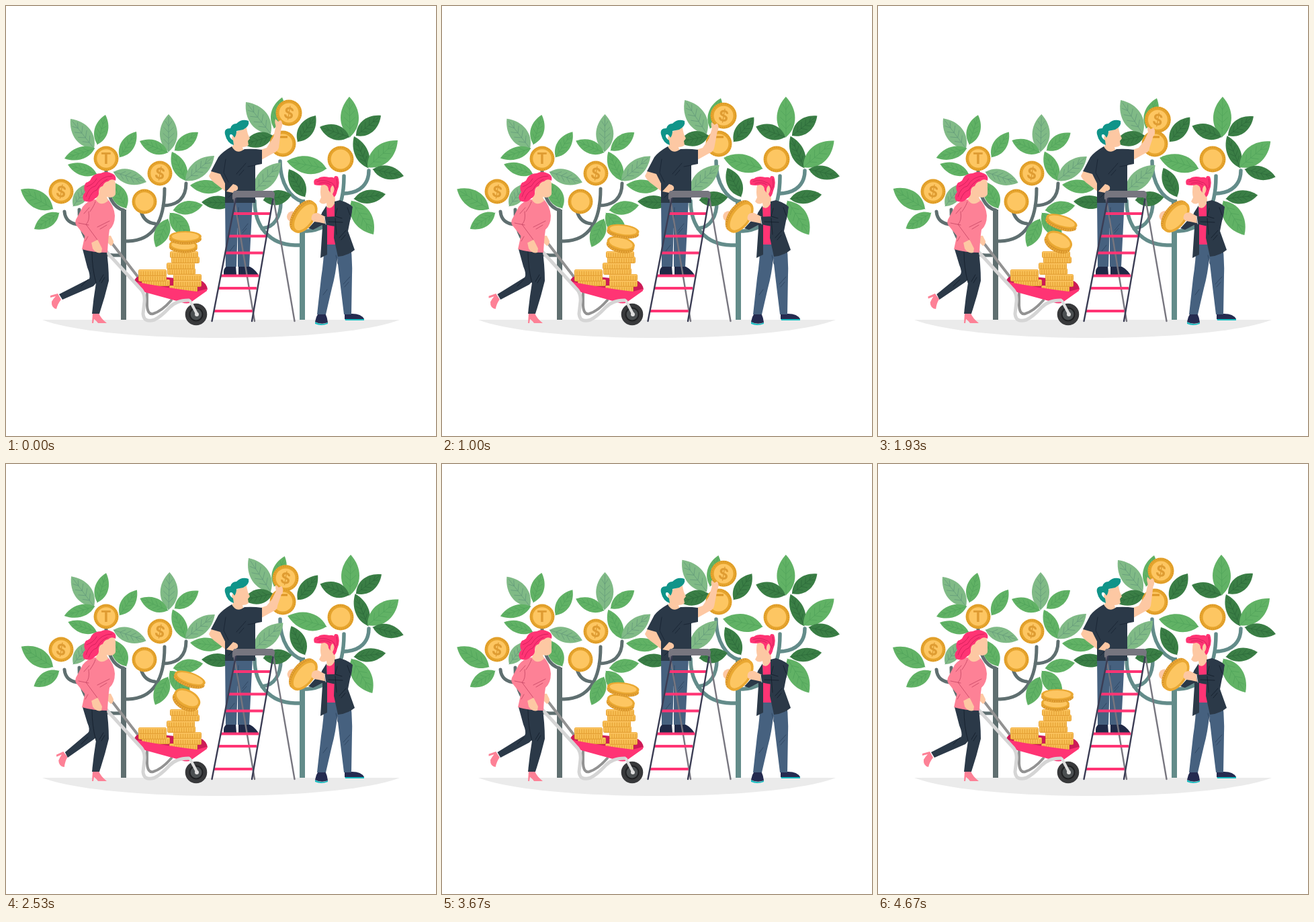
These frames come from a looping animation (640x640 px, 4.81 s). An HTML page:

```html
<!DOCTYPE html>
<html lang="en">
<head>
<meta charset="utf-8">
<title>Money trees</title>
<style>
  html, body { margin: 0; width: 100%; height: 100%; overflow: hidden; background: #fff; }
  svg { display: block; width: 100vw; height: 100vh; }
  .line { fill: none; stroke-linecap: round; stroke-linejoin: round; }
  .fold { fill: none; stroke-width: .8; stroke-linecap: round; }
  text { font: bold 23px Inter, Arial, sans-serif; text-anchor: middle; fill: #df9c32; }
  .skin { fill: #fdc8a3; }
  .navy { fill: #2b3948; }
  .denim { fill: #46617f; }
  .rose { fill: #fd8196; }
  .pink { fill: #ff3474; }
</style>
</head>
<body>
<svg viewBox="0 0 640 640">
  <path fill="#ebebeb" d="M54 467H586C540 485 430 494 320 494S100 485 54 467Z"/>

  <g class="line" stroke="#5f6f70" stroke-width="5">
    <path stroke-width="8" stroke-linecap="butt" d="M175 467V303"/>
    <path d="M175 304C160 300 149 285 149 245M175 350H182C218 349 236 322 236 272M234 297C257 297 268 284 268 264M201 306C204 316 211 323 222 324"/>
    <path d="M175 371H160C130 370 109 345 109 303M87 306C88 318 96 325 110 325"/>
  </g>
  <g class="line" stroke="#638c8a" stroke-width="5.5">
    <path stroke-width="8" stroke-linecap="butt" d="M441 467V288"/>
    <path d="M441 291C424 286 408 265 408 231M441 335H448C487 333 503 300 503 253M504 279C528 278 540 264 540 245"/>
    <path d="M441 356H430C392 355 370 328 370 290M381 331C400 330 409 312 409 292"/>
  </g>

  <g id="leaves"></g>
  <g id="treeCoins"></g>

  <!-- man on the ladder -->
  <g>
    <path fill="#1f2946" d="M324 400Q323 390 329 387H342L343 400ZM346 400V387H360Q368 389 375 399V400Z"/>
    <path class="denim" d="M326 288H367L362 388H345L345 326L343 388H327Z"/>
    <path class="fold" stroke="#2c425c" d="M346 300L345 330M352 334L360 324M333 365L340 356M352 338L358 331"/>
    <path class="skin" d="M306 245L302 253Q305 260 314 266L328 277Q337 281 345 274Q348 268 340 265L329 264L319 249Z"/>
    <path class="skin" d="M340 188L336 196L338 207L334 214Q343 224 354 217L352 210Q358 210 361 207L360 201L363 197Q359 190 358 181Z"/>
    <path id="arm" class="skin"/>
    <path class="navy" d="M336 209Q343 222 355 213Q368 212 381 214V235L371 237L371 293H326V264L319 250L305 246L316 225Q322 217 336 209Z"/>
    <path class="fold" stroke="#172331" d="M327 228L324 248L331 262M371 237L360 239M343 250L357 234M347 252L354 244M331 285L344 272"/>
    <path fill="#109489" d="M326 191Q324 182 334 182Q336 175 343 175Q351 167 361 171Q363 179 353 184L343 186Q343 192 340 196Q336 189 333 192Q332 196 338 200L339 207Q329 204 326 191Z"/>
    <path class="skin" d="M338 265Q347 267 345 273L338 278L328 276Z"/>
  </g>
  <g id="heldHigh"></g>
  <path id="fingers" class="skin"/>

  <!-- ladder -->
  <g class="line">
    <path stroke="#77767f" stroke-width="2.4" d="M339 283L370 469M397 280L429.5 469"/>
    <path id="rungs" stroke="#ff3474" stroke-width="4" stroke-linecap="butt"/>
    <path stroke="#3b3d54" stroke-width="2.4" d="M342.5 284L306.5 469M398 284L366 469"/>
  </g>
  <path fill="#77767f" d="M340 275H396Q400 276 400 281L399 287L394 285H343L337 288Q336 277 340 275Z"/>

  <!-- man with the coin -->
  <g>
    <path id="farHand" class="skin" d="M427 305Q419 306 418 313Q418 319 424 321L432 320Z"/>
    <path fill="#18bcc0" d="M460 470Q469 476 479 471V473Q469 477 460 473ZM504 465H533V468H505Z"/>
    <path fill="#252b50" d="M460 470Q461 463 465 457H475Q478 463 479 471Q469 475 460 470ZM504 458H515Q529 458 533 466H504Z"/>
    <path class="denim" d="M474 350H512Q516 375 515 400L514 459H503L497 410L493 375Q491 398 485 420L476 459H463L469 405Q473 380 474 350Z"/>
    <path class="fold" stroke="#2c425c" d="M491 371L494 384M502 414L512 403M504 418L510 411M472 430L478 422"/>
    <path class="skin" d="M469 266Q467 278 469 285L466 291Q471 297 477 293L478 301L486 304L490 292L489 265Z"/>
    <path class="pink" d="M477 299Q484 304 489 294L493 355H478Z"/>
    <path class="navy" d="M489 291L497 289Q510 293 516 299L509 335L519 363Q508 372 494 373L488 345L489 318ZM477 297L470 308L471 330L468 375L478 370L478 320Z"/>
    <path id="farArm" class="navy" d="M470 309L450 331L457 333L473 325Z"/>
    <path class="pink" d="M459 266Q456 257 464 257Q470 252 481 255Q486 254 488 256Q489 251 494 254Q498 264 493 275Q491 284 488 284L486 280Q491 271 486 267Q482 270 483 278L480 274Q480 267 474 266Q466 268 459 266Z"/>
    <path class="fold" stroke="#cc1c57" d="M463 261Q474 258 481 262Q489 263 491 274M466 264Q477 261 483 266M492 257Q494 266 492 271"/>
    <g id="heldLow"></g>
    <g id="nearHand">
      <path class="skin" d="M476 314L464 308Q456 308 455 313Q453 319 459 321L466 322L475 324Z"/>
      <path class="navy" d="M515 299Q515 320 507 326Q497 331 475 325L474 314L494 313L497 300Z"/>
      <path class="fold" stroke="#fff" d="M474 314L476 325"/>
    </g>
    <path class="fold" stroke="#121c29" d="M493 301L490 313L500 316M508 300L512 311M480 321L501 322M496 345L506 334M499 348L505 341M490 316L492 340"/>
  </g>

  <!-- wheelbarrow -->
  <g class="line" stroke="#929292" stroke-width="4">
    <path d="M156 351L197 404M210 427V446Q211 460 219 458Q232 454 246 438"/>
  </g>
  <path fill="#cd1b57" d="M194 404L203 400L291 409Q299 413 300 422L282 428L189 411Z"/>
  <g id="piles"></g>
  <g id="loose"></g>
  <path class="pink" d="M189 411L196 411Q236 419 284 425L299 421V424L275 441Q270 444 261 441L207 426Q195 419 189 411Z"/>
  <path class="line" stroke="#d5d5d5" stroke-width="5" d="M140 363H147L202 423Q207 430 206 440L204 458Q205 472 221 467Q231 462 243 449Q253 438 272 438"/>
  <circle cx="283" cy="459" r="16.3" fill="#38393b"/>
  <circle cx="283" cy="459" r="9.5" fill="#4b4f51" stroke="#1f2022" stroke-width="2"/>
  <path class="line" stroke="#dedede" stroke-width="4" d="M274 439L284 458"/>
  <circle cx="284" cy="459" r="3" fill="#dedede"/>

  <!-- woman -->
  <g>
    <path id="backShoe" class="rose" d="M77 428L82 437Q77 443 75 451Q67 449 68 440Q71 435 74 432L66 434L66 431Z"/>
    <path id="backLeg" class="navy"/>
    <path class="rose" d="M129 457H138Q141 465 150 472H137Q134 468 131 466L130 472H128Z"/>
    <path class="navy" d="M120 360L149 359Q153 385 153 409Q147 434 139 458H128Q130 436 134 412L126 385Z"/>
    <path class="fold" stroke="#121c29" d="M128 366Q128 390 134 412M112 417L122 407M139 410L145 400M142 412L147 404"/>
    <path class="skin" d="M152 346Q151 341 156 342L160 350Q160 356 156 357L150 351Z"/>
    <path class="rose" d="M132 288L150 286Q161 297 162 312Q162 326 154 333Q152 346 151 367Q130 367 113 362L120 330L107 328Q103 324 105 318L114 299Q121 290 132 288Z"/>
    <path class="skin" d="M139 268L138 280Q134 285 134 289Q141 299 152 290L150 284Q160 287 163 280V264Q161 254 148 251Z"/>
    <path class="skin" d="M126 347L129 361Q134 369 142 367L143 361L136 347Z"/>
    <path class="rose" d="M112 303Q122 302 122 314L121 325L136 348L126 353L106 328Q102 324 104 318Z"/>
    <path class="fold" stroke="#c54563" d="M123 306Q125 320 119 325L136 348M108 323L123 326M136 329L154 320M140 332L150 326M125 306Q132 296 133 291M116 309L124 300M118 350L122 343"/>
    <path class="pink" d="M116 290Q112 283 118 277Q114 269 119 263Q125 261 126 258Q130 249 141 249Q149 245 157 249Q165 252 163 260Q157 256 152 261Q146 262 144 268Q138 269 138 277Q139 283 132 287Q126 294 116 290Z"/>
    <path class="fold" stroke="#cc1c57" d="M119 284Q123 270 133 268Q141 253 158 253M123 288Q127 276 135 274Q141 262 151 258M120 269Q130 266 135 257"/>
  </g>
</svg>
<script>
const LOOP = 4810, SWING = 4670;
const $ = id => document.getElementById(id);
const set = (el, attrs) => { for (const k in attrs) el.setAttribute(k, attrs[k]); return el; };
const add = (parent, tag, attrs) =>
  parent.appendChild(set(document.createElementNS('http://www.w3.org/2000/svg', tag), attrs));

const TONES = {
  g: ['#61b265', '#51a35b'],
  p: ['#80ba86', '#63997a'],
  d: ['#3a7e45', '#2c6a3a']
};
// base x, base y, tip x, tip y, half width, tone
const TREES = {
  left: [
    [131,212, 96,168, 13,'p'], [136,206, 148,162, 10,'g'], [169,225, 194,187, 10,'g'],
    [132,212, 87,227, 9,'g'], [135,250, 92,236, 9,'g'], [160,247, 209,262, 11,'p'],
    [179,301, 158,262, 11,'g'], [100,298, 125,264, 10,'p'], [70,302, 22,273, 13,'g'],
    [79,308, 42,332, 10,'g'], [242,217, 242,161, 13,'p'], [241,218, 199,201, 10,'g'],
    [251,215, 286,188, 10,'g'], [268,260, 247,217, 10,'g'], [267,260, 310,223, 12,'p'],
    [249,304, 293,296, 10,'g'], [241,317, 223,359, 11,'g'], [244,308, 274,344, 12,'g']
  ],
  middle: [
    [323,271, 274,267, 10,'g'], [338,293, 291,292, 10,'d'], [394,190, 357,143, 14,'p'],
    [399,182, 411,136, 10,'g'], [397,193, 354,206, 11,'d'], [434,202, 461,163, 11,'d'],
    [477,242, 418,231, 13,'g'], [368,277, 409,233, 13,'p'], [445,284, 421,243, 11,'d'],
    [383,289, 425,281, 11,'d']
  ],
  right: [
    [512,195, 511,135, 13.5,'g'], [511,195, 467,180, 11,'d'], [521,193, 558,163, 11,'d'],
    [539,241, 518,194, 10,'d'], [538,240, 583,200, 14,'g'], [546,243, 592,253, 10,'d'],
    [518,287, 565,280, 10,'d'], [514,290, 547,340, 14,'g']
  ]
};

function makeLeaf([bx, by, tx, ty, half, tone]) {
  const len = Math.hypot(tx - bx, ty - by);
  const angle = Math.atan2(ty - by, tx - bx) * 180 / Math.PI;
  const [fill, stroke] = TONES[tone];
  const el = add($('leaves'), 'g', {});
  const w = half * 4 / 3, a = len * .25, b = len * .68;
  add(el, 'path', { fill, d: `M0 0C${a} ${-w} ${b} ${-w} ${len} 0C${b} ${w} ${a} ${w} 0 0Z` });
  let d = `M0 0H${len * .92}`;
  for (let u = .2; u < .8; u += .16) {
    const x = u * len, y = half * .62 * Math.sin(Math.PI * (u + .12));
    d += `M${x + len * .13} ${-y}L${x} 0L${x + len * .13} ${y}`;
  }
  add(el, 'path', { d, class: 'line', stroke, 'stroke-width': .7 });
  return turn => set(el, { transform: `translate(${bx} ${by}) rotate(${angle + turn})` });
}
const leaves = Object.fromEntries(
  Object.entries(TREES).map(([name, list]) => [name, list.map(makeLeaf)]));

function faceCoin(parent, x, y, r, mark = '', tilt = 10) {
  const el = add(parent, 'g', { transform: `translate(${x} ${y})` });
  add(el, 'circle', { r, fill: '#e6a42d' });
  add(el, 'circle', { r: r - 1.6, fill: 'none', stroke: '#d39224', 'stroke-width': 1.6, 'stroke-dasharray': '1.2 2' });
  add(el, 'circle', { r: r * .74, fill: '#fdc662' });
  if (mark) add(el, 'text', { y: 8.3, transform: `rotate(${tilt})` }).textContent = mark;
  return el;
}

// coin seen at an angle; depth shifts the rim
function tiltedCoin(parent, rx, ry, depth) {
  const el = add(parent, 'g', {});
  add(el, 'ellipse', { cy: depth, rx, ry, fill: '#d9952a' });
  add(el, 'ellipse', { cy: depth * .7, rx: rx - .8, ry: ry - .5, fill: 'none', stroke: '#f0b244', 'stroke-width': 2, 'stroke-dasharray': '1.4 2' });
  add(el, 'ellipse', { rx, ry, fill: '#eaa832' });
  add(el, 'ellipse', { rx: rx * .84, ry: ry * .76, fill: '#fdc662' });
  return el;
}

function flatCoin(x, y) {
  const el = add($('piles'), 'g', { transform: `translate(${x} ${y})` });
  add(el, 'rect', { x: -21, y: -5, width: 42, height: 10, rx: 2.5, fill: '#e5a135' });
  add(el, 'path', { d: 'M-20 .5H20', stroke: '#f8bf55', 'stroke-width': 6.5, 'stroke-dasharray': '2.4 1.1' });
  add(el, 'path', { d: 'M-19.5 -3.6H19.5', stroke: '#fdc662', 'stroke-width': 2, 'stroke-linecap': 'round' });
}

const tree = $('treeCoins');
faceCoin(tree, 149, 227, 18.5, 'T', 0);
faceCoin(tree, 82, 276, 18.5, '$');
faceCoin(tree, 229, 249, 18.5, '$');
faceCoin(tree, 206, 291, 18.5);
faceCoin(tree, 498, 228, 19.5);
const barred = faceCoin(tree, 412, 205, 19.5);
add(barred, 'path', { d: 'M-7 -10H7', stroke: '#dc9526', 'stroke-width': 3 });

for (const [x, y] of [
  [264, 421], [270, 413], [270, 404], [261, 395], [260, 387], [267, 378], [265, 370],
  [223, 412], [218, 405], [218, 397]
]) flatCoin(x, y);

set($('rungs'), {
  d: [309, 342.5, 367.5, 401.5, 420, 454].map(y => {
    const x = 337.5 - (y - 309) * .195;
    return `M${x} ${y}h${56 + (y - 309) * .01}`;
  }).join('')
});

const high = faceCoin($('heldHigh'), 0, 0, 19.5, '$');
const low = tiltedCoin($('heldLow'), 26.5, 14.5, -4);
const lower = tiltedCoin($('loose'), 21, 9, 4);
const upper = tiltedCoin($('loose'), 24, 8, 4);

const place = (el, x, y, turn = 0, sy = 1) =>
  set(el, { transform: `translate(${x} ${y}) rotate(${turn}) scale(1 ${sy})` });

// quick rise, hold, soft fall
function gust(t) {
  if (t < 800) { const u = t / 800; return u * u * (3 - 2 * u); }
  if (t < 2500) return 1;
  return t < SWING ? (1 - (t - 2500) / (SWING - 2500)) ** 3 : 0;
}

function draw(t) {
  const p = t < SWING ? (1 - Math.cos(2 * Math.PI * t / SWING)) / 2 : 0;
  const mix = (a, b) => a + (b - a) * p;

  leaves.left.forEach(turn => turn(1.4 * p));
  leaves.right.forEach(turn => turn(2 * p));
  leaves.middle.forEach((turn, i) => turn((i < 2 ? 1.2 : 5) * gust(t)));

  place(high, mix(421, 416), mix(159, 170));
  set($('arm'), {
    d: `M379 214L388 211L${mix(398, 396)} ${mix(195, 201)}L402 ${mix(177, 189)}` +
       `L${mix(410, 411)} ${mix(179, 191)}L${mix(406, 404)} 211Q404 217 398 219L380 229Z`
  });
  set($('fingers'), {
    d: 'M402 180Q399 172 401 168L405 172L409 170Q413 174 410 182Z',
    transform: `translate(${p} ${12 * p})`
  });

  place(low, mix(444.5, 444), 314.5, mix(-56, -52));
  set($('farHand'), { transform: `translate(${.6 * p} ${-.6 * p})` });
  set($('nearHand'), { transform: `rotate(${1.2 * p} 508 318)` });

  place(upper, mix(267, 274), mix(343, 318.5), mix(0, 19), mix(1, 1.1));
  place(lower, mix(264, 270), mix(356, 348.5), mix(3, 29), mix(.9, 1.4));

  set($('backLeg'), {
    d: `M114 362L121 ${mix(389, 385)}Q126 ${mix(401, 396)} ${mix(124, 122)} ${mix(406, 400)}` +
       `L${mix(79, 88)} 429L${mix(84, 92)} 437L${mix(130, 129)} ${mix(417, 411)}` +
       `Q138 ${mix(411, 406)} 139 393L148 362Z`
  });
  set($('backShoe'), { transform: `translate(${9 * p} ${-.5 * p}) rotate(${-9 * p} 80 432)` });
}

const start = performance.now();
function tick(now) {
  draw(Math.max(0, now - start) % LOOP);
  requestAnimationFrame(tick);
}
draw(0);
requestAnimationFrame(tick);
</script>
</body>
</html>
```
